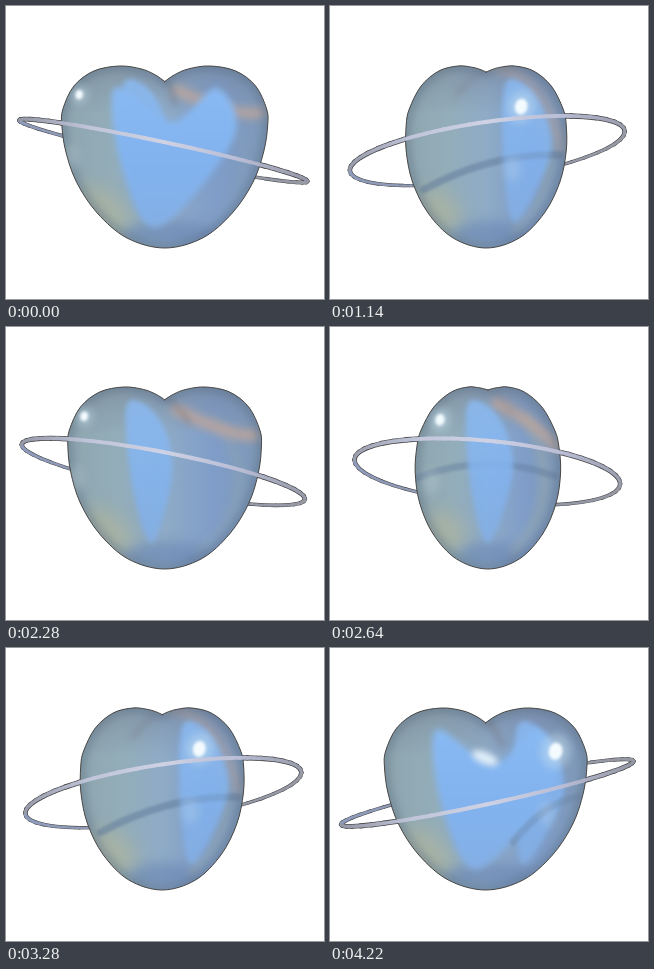
An HTML page with a canvas for the animation above (4240 ms loop, 318 px wide and 293 px high).

```html
<!DOCTYPE html>
<html>
<head>
<meta charset="utf-8">
<title>Glass heart</title>
<style>
html, body { margin: 0; width: 100%; height: 100%; overflow: hidden; background: #fff; }
canvas { display: block; }
</style>
</head>
<body>
<canvas id="stage" width="318" height="293"></canvas>
<script>
const ctx = document.getElementById('stage').getContext('2d');
const CYCLE = 2120, TAU = Math.PI * 2, RAD = Math.PI / 180;

// Right half of the heart, from the notch to the tip
const half = [[0, 76], [10, 69], [24, 63], [46, 60], [72, 65], [92, 80], [103, 103],
  [104, 119], [100, 145], [89, 176], [68, 207], [38, 232], [0, 242]];
// Bright heart seen through the glass when it faces the viewer
const face = [[-50, 82], [7, 116], [52, 82], [69, 132], [-6, 221], [-42, 165]];

const clamp = x => Math.max(0, Math.min(1, x));

function ramp(from, to, x) {
  const u = clamp((x - from) / (to - from));
  return u * u * (3 - 2 * u);
}

// Half a turn that slows down towards its end
const angle = t => RAD * (10 + t * (104.5 - .6 * t ** 4.4));

function spline(pts, closed) {
  const n = pts.length, path = new Path2D();
  const at = i => closed ? pts[(i + n) % n] : pts[Math.max(0, Math.min(n - 1, i))];
  path.moveTo(...pts[0]);
  for (let i = 0; i < (closed ? n : n - 1); i++) {
    const [p, a, b, q] = [at(i - 1), at(i), at(i + 1), at(i + 2)];
    path.bezierCurveTo(a[0] + (b[0] - p[0]) / 6, a[1] + (b[1] - p[1]) / 6,
      b[0] - (q[0] - a[0]) / 6, b[1] - (q[1] - a[1]) / 6, ...b);
  }
  path.closePath();
  return path;
}

function curve(a, b, c) {
  const path = new Path2D();
  path.moveTo(...a);
  path.quadraticCurveTo(...b, ...c);
  return path;
}

// Silhouette of the turned body: heart from the front, ellipse from the side
function bodyPath(cx, c, s) {
  const right = half.map(([x, y], i) => {
    if (i < 4) return [x * Math.abs(c), 60 + (y - 60) * c * c];
    const side = 65 * Math.sqrt(Math.max(0, 1 - ((y - 151) / 91) ** 2));
    return [Math.hypot(x * c, side * s), y];
  });
  const left = right.slice(0, -1).reverse().map(([x, y]) => [-x, y]);
  return spline([...right, ...left].map(([x, y]) => [cx + x, y]));
}

function soft(blur, alpha, draw) {
  ctx.save();
  ctx.filter = `blur(${blur}px)`;
  ctx.globalAlpha = clamp(alpha);
  draw();
  ctx.restore();
}

function line(path, color, width) {
  ctx.strokeStyle = color;
  ctx.lineWidth = width;
  ctx.stroke(path);
}

function gradient(x0, y0, x1, y1, ...stops) {
  const g = ctx.createLinearGradient(x0, y0, x1, y1);
  stops.forEach((color, i) => g.addColorStop(i / (stops.length - 1), color));
  return g;
}

function spot(x, y, rx, ry, color, turn = 0) {
  ctx.fillStyle = color;
  ctx.beginPath();
  ctx.ellipse(x, y, rx, ry, turn, 0, TAU);
  ctx.fill();
}

function drawBody(phi, c, s) {
  const cx = 157.2 + 1.6 * c, w = Math.hypot(104.5 * c, 65 * s);
  const body = bodyPath(cx, c, s);
  const at = (u, y) => [cx + u * w, y];
  ctx.save();
  ctx.clip(body);
  ctx.fillStyle = gradient(cx - w, 0, cx + w, 0, '#8ea5ae', '#93adb9', '#8fabc6', '#7f9dc9', '#7e98b6');
  ctx.fillRect(0, 0, 318, 293);
  ctx.fillStyle = gradient(0, 58, 0, 108, 'rgba(116,128,148,.5)', 'rgba(116,128,148,0)');
  ctx.fillRect(0, 50, 318, 60);

  // Tints refracted at the rim
  soft(9, .6, () => spot(...at(-.6, 205), w * .33, 20, '#b3b69a', .7));
  soft(6, .65, () => spot(...at(.05, 228), w * .45, 13, '#6c88b4'));
  soft(4, .5 * s, () => line(curve(at(.5, 90), at(1.1, 165), at(.35, 225)), '#a3ae9f', 8));
  const warm = curve(at(.12, 70 + 14 * c), at(.65, 84 + 28 * c), at(.93, 130 - 24 * c));
  soft(4, .35 + .35 * Math.cos(phi - .7), () => line(warm, '#cfa992', 11));
  const notch = 60 + 16 * c * c, fold = cx + 60 * s * c;
  const crease = curve([cx, notch - 4], [(cx + fold) / 2, notch + 4], [fold, notch + 22]);
  soft(3, .4 * Math.abs(c), () => line(crease, '#75727d', 6));

  // Shadow of the ring, partly hidden by the bright blade
  const from = -1 + .28 * Math.max(0, phi - 1.3) ** 2;
  const shade = curve(at(from, 165 - 30 * c), at((from + .9) / 2, 133 - 22 * c), at(.9, 149));
  const drawShade = () => line(shade, '#657f9e', 7);
  soft(1, .55 * ramp(.6, 1.2, phi) * s, drawShade);

  const blueFill = gradient(0, 75, 0, 235, '#8abaf3', '#82b3ef', '#84aee3');
  const fillBlue = pts => {
    ctx.fillStyle = blueFill;
    ctx.fill(spline(pts, true));
  };
  const x = 152 - 36 * c;
  soft(2.5, .85, () => fillBlue([[x, 82], [x + 20, 78], [x + 40, 105], [x + 46, 150],
    [x + 18 + 10 * c, 216], [x + 3 + 5 * c, 165]]));
  const facing = 1 - ramp(10, 27, phi / RAD) + ramp(165, 196, phi / RAD);
  soft(3, facing, () => fillBlue(face.map(([x, y]) => [cx + x, y])));
  soft(1, -.35 * c, drawShade);

  soft(4, .5, () => line(body, '#566b80', 8));

  // Highlights glide across the surface
  const gx = 150 - 77 * Math.cos(phi - .1), gy = 96 - 7.5 * c, r = 6.7 - 2 * c;
  soft(5, .25, () => spot(gx - 9, gy + 62, 8, 13, '#d3e2e6'));
  soft(4, .5, () => spot(gx, gy, r * 1.7, r * 2, '#c6dfee', .2));
  soft(1.5, 1, () => spot(gx, gy, r * .8, r, '#f4fbff', .2));
  soft(3, .9 * ramp(170, 195, phi / RAD), () => spot(155, 110, 14, 6, '#e9f5ff', .4));
  ctx.restore();
  line(body, '#494846', 1);
}

// Draws the ring between two angles; it grows thicker towards the viewer
function drawRing(c, s, from, to, color, extra) {
  const a = Math.hypot(148 * c, 132.5 * s) - 1.5 * c - 2;
  const b = 1 + 38 * Math.tanh(1.2 * s), slope = .22 * c - .005, steps = 48;
  const point = i => {
    const th = from + (to - from) * i / steps, x = a * Math.cos(th);
    return [157.3 + x, 144.8 + slope * x - b * Math.sin(th)];
  };
  ctx.lineCap = 'round';
  for (let i = 0; i < steps; i++) {
    const path = new Path2D(), th = from + (to - from) * (i + .5) / steps;
    path.moveTo(...point(i));
    path.lineTo(...point(i + 1));
    line(path, color, 2.8 + 1.2 * Math.sin(th) + extra);
  }
}

const start = performance.now();
function frame() {
  const phi = angle((performance.now() - start) % CYCLE / 1000);
  const c = Math.cos(phi), s = Math.sin(phi);
  const silver = gradient(10, 0, 305, 0, '#9396a4', '#c0c5da', '#cfd2e4', '#b9bed6', '#9396a4');
  ctx.fillStyle = '#fff';
  ctx.fillRect(0, 0, 318, 293);
  drawRing(c, s, 0, TAU, '#4d4c4f', 1.6);
  drawRing(c, s, Math.PI, TAU, gradient(10, 0, 305, 0, '#8e9bbc', '#9799a3'), .4);
  drawBody(phi, c, s);
  drawRing(c, s, 0, Math.PI, silver, 0);
  requestAnimationFrame(frame);
}
frame();
</script>
</body>
</html>
```
